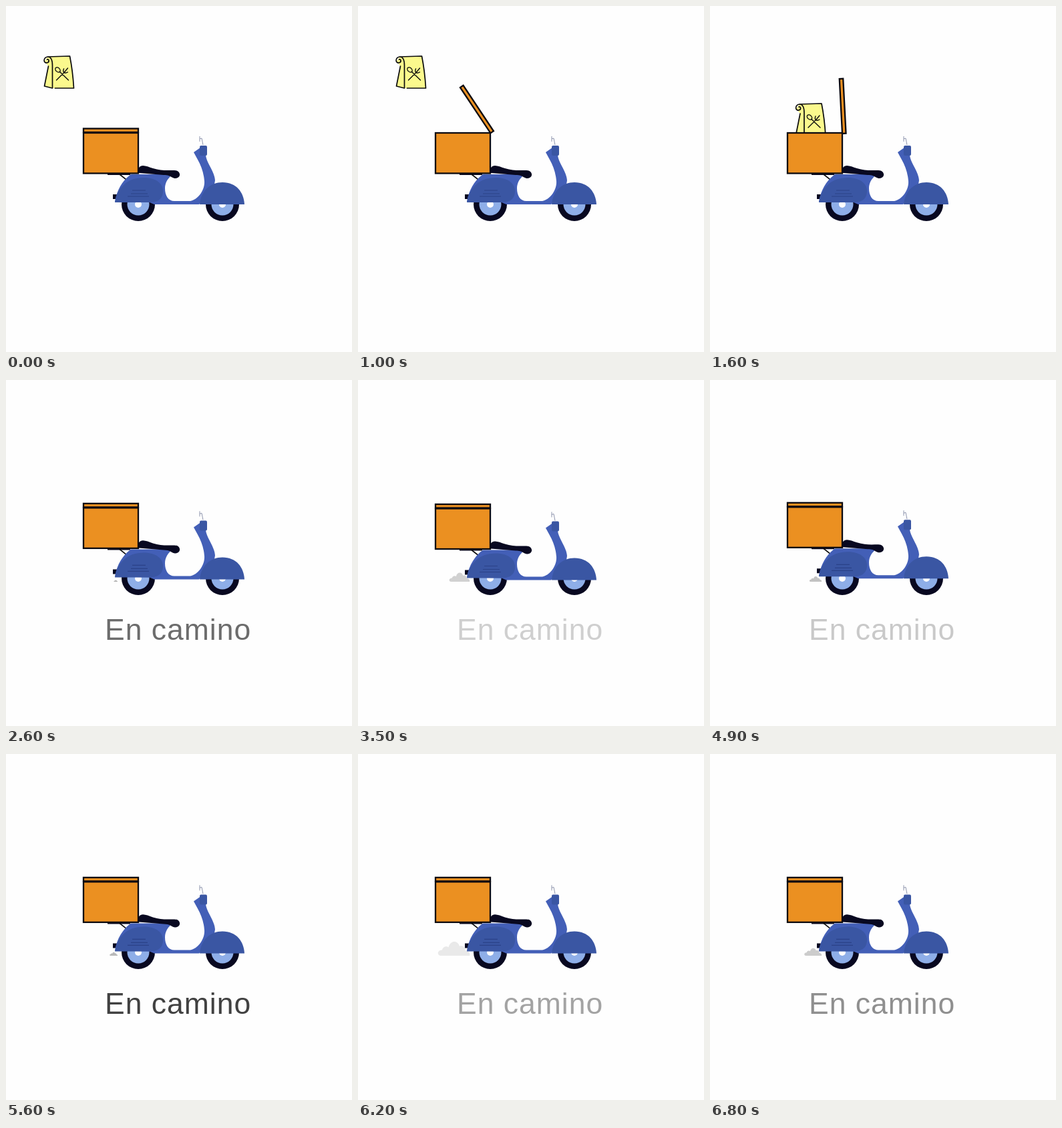
These frames come from a looping animation (518 by 518 pixels, 6900 ms). An HTML page:

```html
<!DOCTYPE html>
<html lang="es">
<head>
<meta charset="utf-8">
<title>En camino</title>
<style>
  html, body { margin: 0; width: 100%; height: 100%; overflow: hidden; background: #fefefe; }
  svg { display: block; width: 100%; height: 100%; }
  .ink { fill: #080820; }
  .paint { fill: #435fb7; }
  .shade { fill: #3a56a3; }
  .line { fill: none; stroke: #0c0c0c; stroke-width: 1.7; stroke-linecap: round; stroke-linejoin: round; }
  .thin { stroke-width: 1.4; }
  .crate { fill: #eb9021; stroke: #0c0a10; stroke-width: 2.3; }
  .label { font: 44.5px "Liberation Sans", Arial, sans-serif; letter-spacing: 1px; fill: #2a2a2a; }
</style>
</head>
<body>
<svg viewBox="0 0 518 518">
  <defs>
    <g id="wheel">
      <circle class="ink" r="25"/>
      <circle r="16.5" fill="#8eaee8"/>
      <circle r="5" fill="#fefefe"/>
    </g>
  </defs>

  <use href="#wheel" x="198" y="297"/>
  <use href="#wheel" x="324" y="297"/>

  <path id="smoke" fill="#a9a9a9" d="M0 0H-46C-52-2-50-9-43-9C-42-14-36-16-33-13C-30-25-18-24-16-15C-10-17-6-12-7-8C-2-8 2-3 0 0Z"/>

  <g id="ride">
    <path class="ink" d="M152 250H186V253H152ZM160 282H169V289H160Z"/>
    <path class="line" d="M170 252L184 263"/>

    <!-- frame, floor and front shield -->
    <path class="paint" d="M163 293C166 274 176 260 187 252H250C243 257 238 264 238 273C238 284 243 292 252 292H276C287 290 298 276 297 262C296 249 292 239 287 230L281 219L291 212L299 223C300 235 312 247 313 261C312 274 302 285 289 297H222L215 294Z"/>
    <path class="shade" d="M163 294C167 271 182 257 206 257C226 257 236 267 235 279C234 290 226 294 214 294Z"/>
    <path class="shade" d="M290 297C292 276 306 264 324 264C345 264 356 279 357 297Z"/>
    <rect class="shade" x="290" y="209" width="11" height="15" rx="2"/>
    <path d="M189 276H209M187 281H212M182 285H214" fill="none" stroke="#2b4288" stroke-width="1.2"/>
    <path d="M290 195V203M290 199L293 198L295 208" fill="none" stroke="#8d94ad" stroke-width="1"/>
    <path class="ink" d="M199 242C203 236 211 240 220 243C232 247 242 246 252 246C262 246 263 257 254 258C247 258 248 253 236 253L199 250Z"/>

    <!-- order bag, its corner at 0,0 -->
    <g id="bag">
      <path fill="#fbf98d" d="M6 1L39 0C42 15 44 31 45 48H13L1 45L7 15L1 8Z"/>
      <path class="line" d="M6 1L39 0C42 15 44 31 45 48H17M6 1C12 1 13 7 13 14V48L1 45L7 15M6 1C-1 2-1 11 5 10C9 9 8 4 5 5"/>
      <g class="line thin">
        <ellipse cx="21" cy="20.5" rx="3" ry="4.2" transform="rotate(-45 21 20.5)"/>
        <path d="M24 23.5L37 36M19 36L31 24M30 19C28 24 31 27 36 24M31 24L36 18"/>
      </g>
    </g>

    <rect class="crate" x="116" y="190" width="82" height="60.5"/>
    <g id="lid"><rect class="crate" x="-81" y="-6.5" width="82" height="5.5"/></g>
  </g>

  <text id="label" class="label" x="148" y="389.3">En camino</text>
</svg>

<script>
const LOOP = 6900, STEP = 100;
const [ride, bag, lid, smoke, label] =
  ["ride", "bag", "lid", "smoke", "label"].map(id => document.getElementById(id));

const progress = (t, from, to) => Math.min(1, Math.max(0, (t - from) / (to - from)));
const smooth = p => p * p * (3 - 2 * p);
const wave = turns => Math.cos(2 * Math.PI * turns);
const move = (el, value) => el.setAttribute("transform", value);

function draw(t) {
  const bob = t < 2200 ? 0 : 1.4 + 1.1 * wave(t / 400 + 0.25);
  move(ride, `translate(0 ${bob})`);

  // the bag speeds up sideways, then drops into the crate
  const fall = progress(t, 1000, 1600);
  move(bag, `translate(${56.5 + 71.5 * fall ** 1.6} ${75 + 71 * fall ** 3.8})`);
  bag.style.opacity = t < 1700 ? 1 : 0;

  const open = smooth(progress(t, 700, 1200)) - smooth(progress(t, 1700, 2250));
  move(lid, `translate(197 190) rotate(${87 * open})`);

  const puff = Math.max(0, (t - 2563) / 370) % 1;
  move(smoke, `translate(167 302) scale(${1.15 * puff})`);
  smoke.style.opacity = 1 - 0.9 * puff;

  const pulse = 0.575 + 0.405 * wave((t - 4325) / 1431);
  label.style.opacity = progress(t, 2150, 2300) * pulse;
}

const start = performance.now();
function tick(now) {
  const t = Math.max(0, now - start) % LOOP;
  draw(Math.floor(t / STEP) * STEP);
  requestAnimationFrame(tick);
}
draw(0);
requestAnimationFrame(tick);
</script>
</body>
</html>
```
